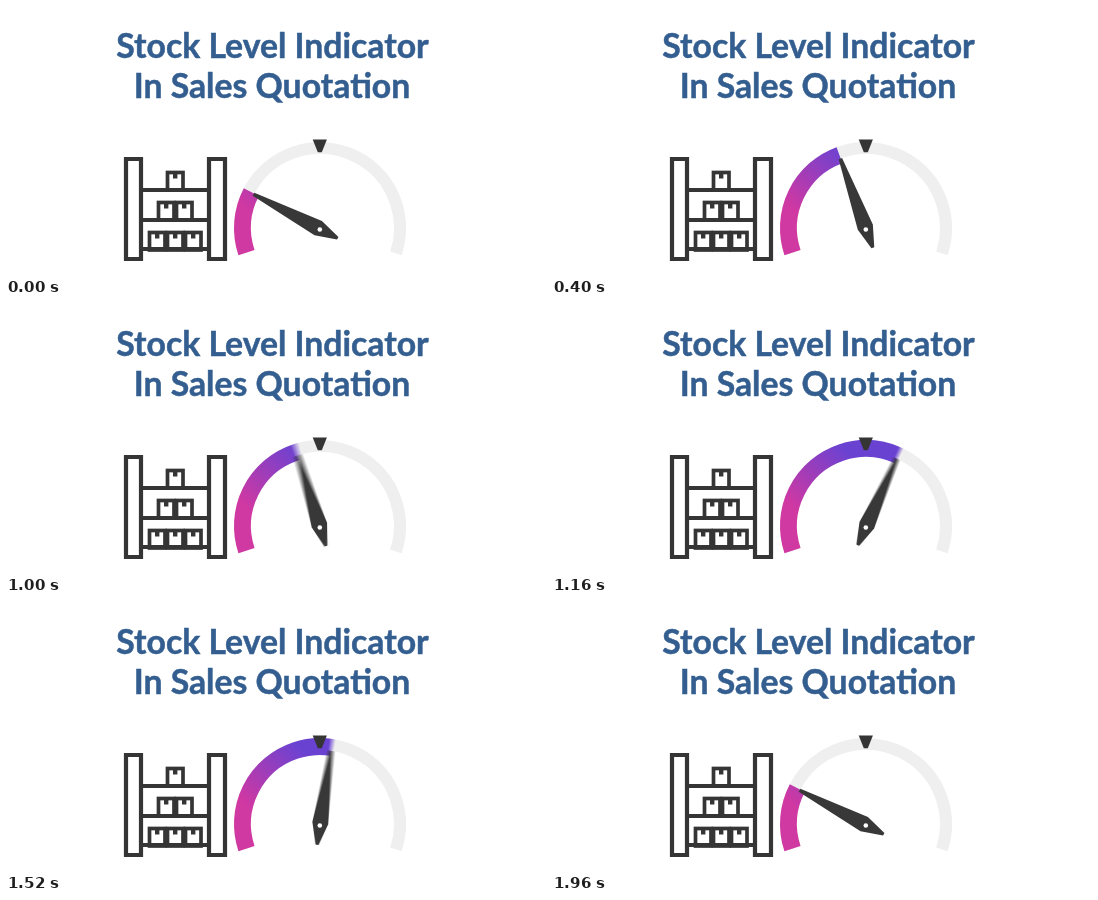
Animation, 540 px wide and 270 px high, one loop 2000 ms. Source, as an HTML page with a canvas:

```html
<!DOCTYPE html>
<html lang="en">
<head>
<meta charset="utf-8">
<title>Stock Level Indicator</title>
<style>
  html, body { margin: 0; width: 100%; height: 100%; overflow: hidden; background: #fff; }
  canvas, svg { position: absolute; left: 0; top: 0; }
  text { font: 700 33.75px Lato, sans-serif; fill: #335e8f; stroke: #335e8f; stroke-width: .5; text-anchor: middle; }
</style>
</head>
<body>
<canvas id="stage" width="540" height="270"></canvas>
<svg width="540" height="270">
  <defs>
    <g id="box">
      <rect x="1.5" y="1.5" width="15.5" height="17.5" stroke-width="3.7"/>
      <path d="M9.2 2v5.5" stroke-width="4.4"/>
    </g>
  </defs>
  <text x="266.5" y="52">Stock Level Indicator</text>
  <text x="266" y="92">In Sales Quotation</text>
  <g fill="none" stroke="#363536" stroke-width="4.2">
    <path d="M120 153h15v100h-15zM203 153h16v100h-16zM135 184h68M135 214h68M135 243h68"/>
    <use href="#box" x="160" y="165"/>
    <use href="#box" x="151" y="195"/>
    <use href="#box" x="169" y="195"/>
    <use href="#box" x="142" y="225"/>
    <use href="#box" x="160" y="225"/>
    <use href="#box" x="178" y="225"/>
  </g>
  <path d="M306.7 133.5h14.2l-5.1 12.8h-4z" fill="#363536"/>
</svg>
<script>
const LOOP = 2000, STEP = 40, SHUTTER = 20, SAMPLES = 10;
const CX = 314, CY = 222, END = 108.5;
// [time in ms, needle angle in degrees from upright]
const KEYS = [[0, -62.4], [400, -20], [440, -20], [795, -53], [1255, 33], [1300, 33], [1950, -62.4], [2000, -62.4]];

const view = document.getElementById('stage').getContext('2d');
const layer = document.createElement('canvas');
layer.width = 540;
layer.height = 270;
const g = layer.getContext('2d');

const sweep = g.createLinearGradient(237, 200, 290, 142);
sweep.addColorStop(0, '#d038a2');
sweep.addColorStop(1, '#6a42d2');

const rad = deg => deg * Math.PI / 180;

function angleAt(t) {
  const i = Math.max(1, KEYS.findIndex(k => k[0] >= t));
  const [t0, a0] = KEYS[i - 1], [t1, a1] = KEYS[i];
  return a0 + (a1 - a0) * (1 - Math.cos(Math.PI * (t - t0) / (t1 - t0))) / 2;
}

function band(to, width, color) {
  g.beginPath();
  g.arc(CX, CY, 86 - width / 2, rad(-END - 90), rad(to - 90));
  g.lineWidth = width;
  g.strokeStyle = color;
  g.stroke();
}

function drawGauge(angle) {
  g.fillStyle = '#fff';
  g.fillRect(0, 0, 540, 270);
  band(END, 12, '#efefef');
  band(angle, 17, sweep);

  g.save();
  g.translate(CX, CY + 1);
  g.rotate(rad(angle));
  g.fillStyle = '#393839';
  g.beginPath();
  for (const [x, y] of [[-1.8, -75], [1.8, -75], [8, -2], [1.5, 20], [-1.5, 20], [-8, -2]]) g.lineTo(x, y);
  g.fill();
  g.restore();

  g.fillStyle = '#fff';
  g.beginPath();
  g.arc(CX - 0.2, CY + 1.5, 2.3, 0, 7);
  g.fill();
}

function frame(now) {
  const t = Math.floor(now % LOOP / STEP) * STEP;
  // Only the large swing is motion-blurred: average several moments.
  const count = t > 800 && t < 1900 ? SAMPLES : 1;
  for (let i = 0; i < count; i++) {
    const offset = count > 1 ? i / (count - 1) - 0.5 : 0;
    drawGauge(angleAt(t + SHUTTER * offset));
    view.globalAlpha = 1 / (i + 1);
    view.drawImage(layer, 0, 0);
  }
  requestAnimationFrame(frame);
}

requestAnimationFrame(frame);
</script>
</body>
</html>
```
